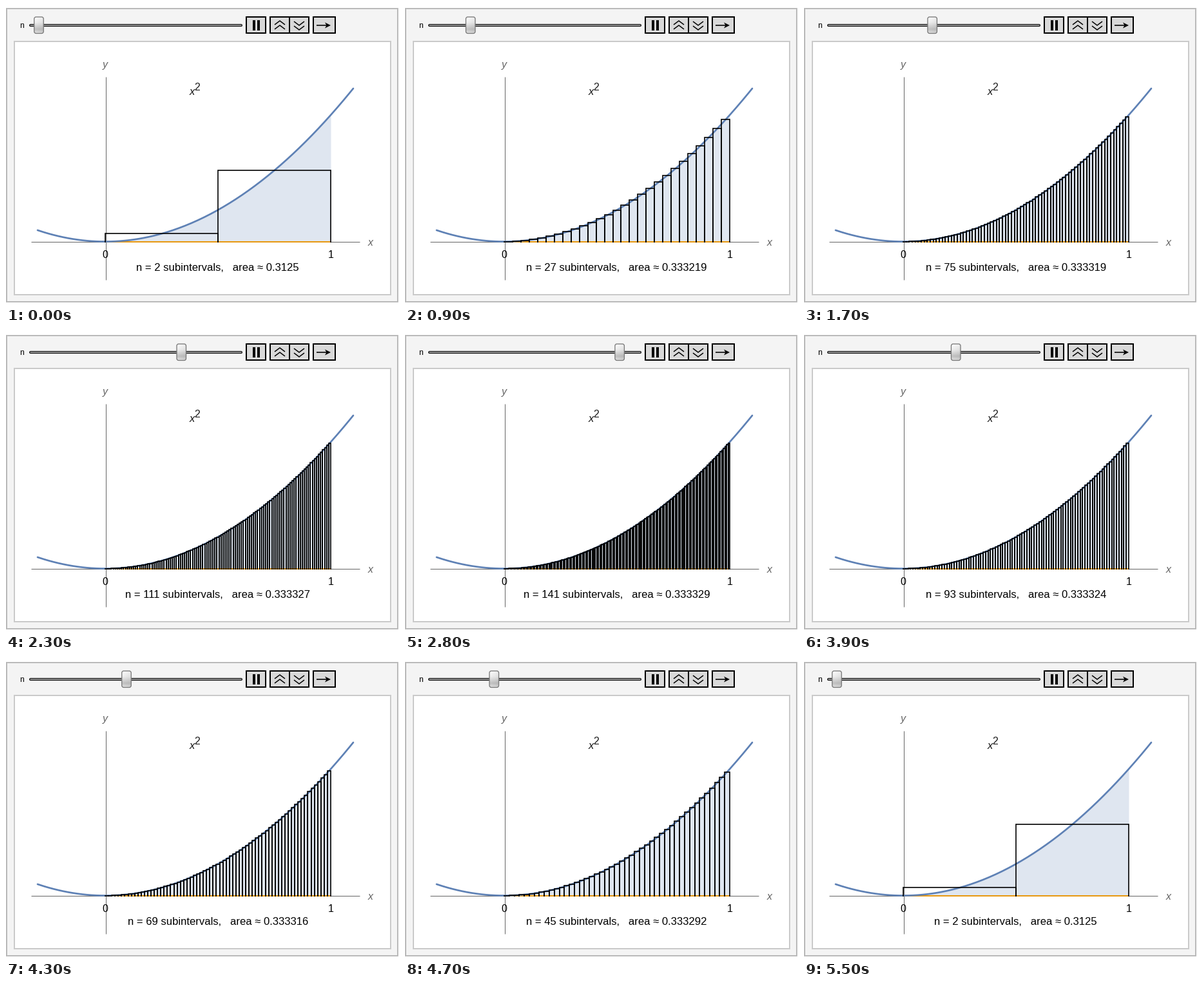
These frames come from a looping animation (610 px wide and 464 px high, 6 s). A matplotlib script:

```python
import numpy as np
import matplotlib.pyplot as plt
from matplotlib.animation import FuncAnimation
from matplotlib.collections import LineCollection
from matplotlib.patches import FancyBboxPatch, Polygon, Rectangle

W, H, DPI = 610, 464, 64           # this dpi divides both sides exactly
PX = 72 / DPI                      # points per pixel
X0, Y0, XS, YS = 154, 365.6, 350, 196.4
BLUE, ORANGE = "#5e81b5", "#e8980f"
FRAMES, INTERVAL = 60, 100

plt.rcParams["font.family"] = "Liberation Sans"
fig = plt.figure(figsize=(W / DPI, H / DPI), dpi=DPI, facecolor="white")
ax = fig.add_axes([0, 0, 1, 1])


def to_px(x, y):
    return X0 + XS * x, Y0 - YS * y


def line(xs, ys, color, width, z=2, cap="butt"):
    ax.plot(xs, ys, color=color, lw=width * PX, zorder=z,
            solid_capstyle=cap, solid_joinstyle="miter")


def box(left, top, right, bottom, fill, edge, width=2):
    ax.add_patch(Rectangle((left, top), right - left, bottom - top, fc=fill,
                           ec=edge, lw=width * PX, zorder=1))


def label(x, y, s, size=16.6, color="black", ha="center", style="normal"):
    return ax.text(x, y, s, size=size * PX, color=color, ha=ha,
                   va="baseline", style=style, zorder=6)


def draw_panel():
    box(1, 4, 608, 459, "#f4f4f4", "#bababa")
    box(13, 55, 597, 448, "white", "#cacaca")


def draw_controls():
    label(21, 34, "n", 12, ha="left")
    line([38, 365], [30, 30], "#1c1c1c", 4.2, 2, "round")
    line([38, 365], [30, 30], "#a8a8a8", 1.6, 3, "round")
    for left, right in [(373, 403), (410, 440), (440, 470), (477, 511)]:
        box(left, 17, right, 42, "#d9d9d9", "black")
    for x in (385, 392):
        line([x, x], [22, 38], "black", 4)
    for cx, tips, drop in [(425, (23, 30), 6), (455, (30, 37), -6)]:
        for tip in tips:
            line([cx - 8, cx, cx + 8], [tip + drop, tip, tip + drop],
                 "black", 1.5)
    line([482, 499], [30, 30], "black", 1.6)
    ax.add_patch(Polygon([(504, 30), (495, 25.5), (497.5, 30), (495, 34.5)],
                         fc="black", lw=0, zorder=3))


def draw_plot():
    line([39, 549], [365.5, 365.5], "#666666", 1)
    line([154.5, 154.5], [110, 425], "#666666", 1)
    t = np.linspace(0, 1, 120)
    ax.fill_between(*to_px(t, t ** 2), Y0, color="#dfe6f0", lw=0, zorder=1.5)
    line([X0, X0 + XS], [366, 366], ORANGE, 2, 3)
    t = np.linspace(-0.3, 1.1, 200)
    line(*to_px(t, t ** 2), BLUE, 2.7, 3.5, "round")
    label(153.5, 96, "y", 16, "#666666", style="italic")
    label(566, 372, "x", 16, "#666666", style="italic")
    label(285, 138, "x", 16.6, "#1a1a1a", "left", "italic")
    label(292.5, 131, "2", 16, "#1a1a1a", "left")
    label(153.5, 391, "0", 16)
    label(504, 391, "1", 16)


draw_panel()
draw_controls()
draw_plot()

bars = LineCollection([], colors="black", linewidths=1.65 * PX, zorder=4,
                      capstyle="butt", joinstyle="miter")
bars.set_snap(True)
ax.add_collection(bars, autolim=False)
caption = label(328.7, 411, "")

knob = FancyBboxPatch((44, 17), 14.5, 25.5, ec="#777777", fc="none",
                      boxstyle="round,pad=0,rounding_size=3",
                      lw=1.3 * PX, zorder=6)
ax.add_patch(knob)
shade = np.interp(np.linspace(0, 1, 27), [0, 0.35, 0.75, 1],
                  [1, 0.94, 0.76, 0.9])
knob_fill = ax.imshow(shade[:, None] * np.linspace(1, 0.93, 16), cmap="gray",
                      vmin=0, vmax=1, aspect="auto", zorder=5,
                      interpolation="bilinear", extent=(43, 59, 43, 16))

ax.set_xlim(0, W)
ax.set_ylim(H, 0)
ax.axis("off")


def count(frame):
    """Subintervals: up by six per step, mirrored on the way back."""
    step = min(frame - 4, 55 - frame)
    return 6 * step - 3 if step > 0 else 2


def midpoint_bars(n):
    k = np.arange(n)
    left, top = to_px(k / n, ((k + 0.5) / n) ** 2)
    right = left + XS / n
    base = np.full(n, 366.6)
    return np.stack([np.column_stack([left, left, right, right]),
                     np.column_stack([base, top, top, base])], axis=-1)


def update(frame):
    n = count(frame)
    bars.set_segments(midpoint_bars(n))
    area = 1 / 3 - 1 / (12 * n * n)
    caption.set_text(f"n = {n} subintervals,   area ≈ {area:.6g}")
    cx = 51 + 2.03 * (n - 2)
    knob.set_x(cx - 7.25)
    knob_fill.set_extent((cx - 8, cx + 8, 43, 16))
    knob_fill.set_clip_path(knob)
    ax.set_xlim(0, W)
    ax.set_ylim(H, 0)
    return bars, caption, knob, knob_fill


anim = FuncAnimation(fig, update, frames=FRAMES, interval=INTERVAL,
                     init_func=lambda: update(0), repeat=True,
                     repeat_delay=0, blit=False)
plt.show()
```
